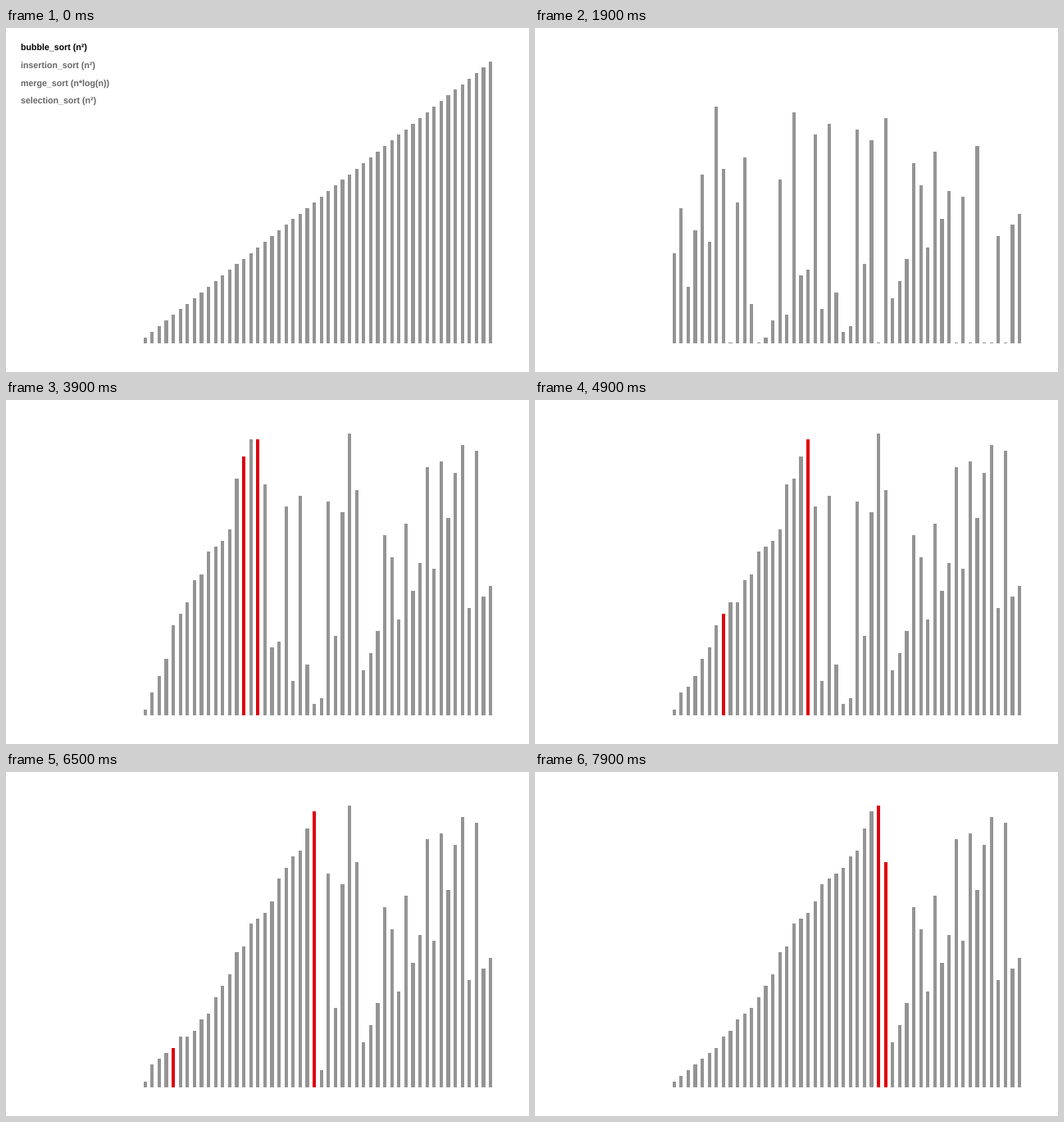
Write a matplotlib script that moves like this. It is 638 px wide and 420 px high and loops after 8000 ms.

```python
import numpy as np
import matplotlib.pyplot as plt
from matplotlib.animation import FuncAnimation
from matplotlib.patches import Rectangle

plt.rcParams["text.hinting"] = "none"

W, H, DPI = 638, 420, 100
FRAMES, INTERVAL = 80, 100
HOVER, CLEAR, SORT = 4, 11, 21        # first frame of each phase

X0, PITCH, BAR_W = 167.5, 8.6, 4.3
BASE, UNIT = 384.6, 6.87
GREY, RED = "#949494", "#df000b"

LABELS = ["bubble_sort (n²)", "insertion_sort (n²)",
          "merge_sort (n*log(n))", "selection_sort (n²)"]

ORDERED = list(range(1, 51))
SHUFFLED = [16, 24, 10, 20, 30, 18, 42, 31, 49, 25,
            33, 7, 46, 1, 4, 29, 5, 41, 12, 13,
            37, 6, 39, 9, 2, 3, 38, 14, 36, 50,
            40, 8, 11, 15, 32, 28, 17, 34, 22, 27,
            44, 26, 45, 35, 43, 48, 19, 47, 21, 23]


def insertion_steps(values):
    """Every comparison and placement as (values, marked indices)."""
    a = list(values)
    steps = []
    for i in range(1, len(a)):
        key, j = a[i], i - 1
        while j >= 0:
            steps.append((a[:], (i, j)))
            if a[j] <= key:
                break
            a[j + 1] = a[j]
            j -= 1
        a[j + 1] = key
        steps.append((a[:], (i, j + 1)))
    return steps


STEPS = insertion_steps(SHUFFLED)

# the sort's timer runs slightly unevenly: (frame, step) pairs
PACE = np.array([(21, 2), (26, 25), (37, 76), (39, 85), (42, 98),
                 (49, 131), (55, 161), (65, 206), (73, 244), (79, 273)])


def state(k):
    if k < CLEAR:
        return ORDERED, ()
    if k < SORT:
        shown = round(4 + 4.75 * (k - CLEAR))
        return [v if v <= shown else 0 for v in SHUFFLED], ()
    return STEPS[int(round(np.interp(k, PACE[:, 0], PACE[:, 1])))]


fig = plt.figure(figsize=(W / DPI, H / DPI), dpi=DPI, facecolor="white")
ax = fig.add_axes([0, 0, 1, 1])
ax.set_xlim(0, W)
ax.set_ylim(H, 0)
ax.axis("off")

bars = [ax.add_patch(Rectangle((X0 + PITCH * i, BASE), BAR_W, 0, lw=0))
        for i in range(len(ORDERED))]
labels = [ax.text(18.4, 28.2 + 21.5 * n, s, family="Liberation Sans",
                  weight="bold", size=10.6 * 72 / DPI, va="baseline")
          for n, s in enumerate(LABELS)]


def draw(k):
    values, marked = state(k)
    for i, (bar, v) in enumerate(zip(bars, values)):
        bar.set_height(-max(v * UNIT, 0.6))
        bar.set_facecolor(RED if i in marked else GREY)
    active = 0 if k < HOVER else 1
    for n, label in enumerate(labels):
        label.set_visible(k < CLEAR)
        label.set_color("black" if n == active else "#666666")
    return bars + labels


anim = FuncAnimation(fig, draw, frames=FRAMES, interval=INTERVAL,
                     repeat=True, repeat_delay=0)
plt.show()
```
